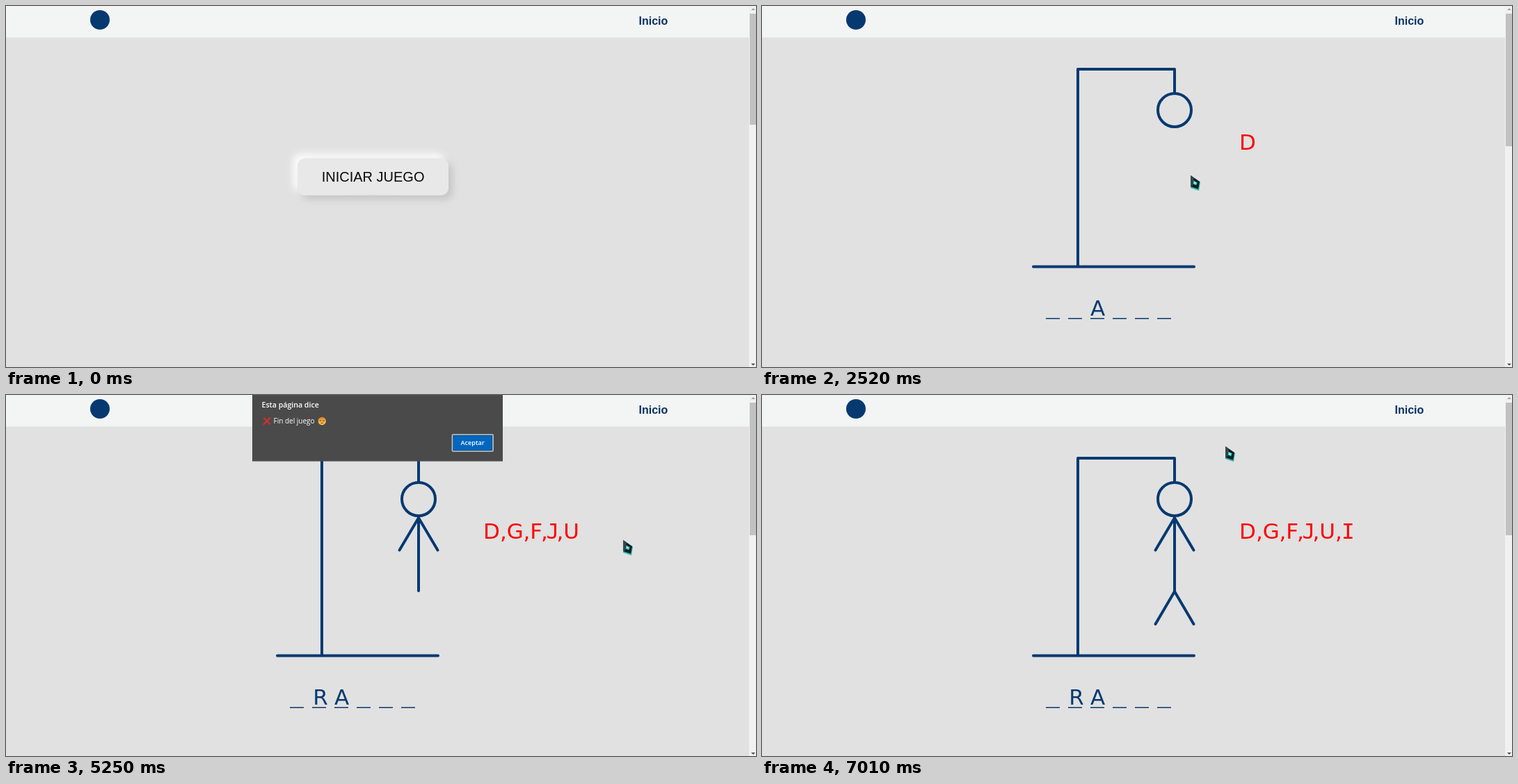
Recreate the animation shown at these times as an HTML page. Size 1078 by 520 pixels, loop 7.08 s.

```html
<!DOCTYPE html>
<html lang="es">
<head>
<meta charset="utf-8">
<title>Juego del ahorcado</title>
<style>
  html, body { margin: 0; width: 100%; height: 100%; overflow: hidden; background: #e1e1e1; }
  svg { display: block; width: 1078px; height: 520px; }
  .arial { font-family: "Liberation Sans", Arial, sans-serif; }
  .game { font: 31px "DejaVu Sans", Verdana, sans-serif; }
  .mono { font-family: "DejaVu Sans Mono", monospace; }
  .dialog { font-family: "Open Sans", "Noto Sans", sans-serif; fill: #fff; }
  .line { fill: none; stroke: #063970; stroke-width: 4; stroke-linecap: round; stroke-linejoin: round; }
</style>
</head>
<body>
<svg viewBox="0 0 1078 520">
  <defs>
    <filter id="soft" x="-20%" y="-60%" width="140%" height="220%"><feGaussianBlur stdDeviation="5.5"/></filter>
    <clipPath id="inside"><rect x="420" y="220" width="215" height="52" rx="9"/></clipPath>
    <linearGradient id="face" x2="0" y2="1"><stop stop-color="#d9822b"/><stop offset="1" stop-color="#ffd257"/></linearGradient>
  </defs>

  <rect width="1078" height="520" fill="#e1e1e1"/>
  <rect width="1068" height="45.5" fill="#f2f5f4"/>
  <circle cx="135" cy="20" r="14" fill="#063970"/>
  <text class="arial" x="909.5" y="27" font-size="16" font-weight="bold" fill="#0a3160">Inicio</text>

  <rect x="1068" width="10" height="520" fill="#f1f1f1"/>
  <rect id="thumb" x="1069" y="11" width="9" height="160" fill="#c1c1c1"/>
  <path d="M1071 6l3-3 3 3z" fill="#a3a3a3"/>
  <path d="M1071 515l3 3 3-3z" fill="#505050"/>

  <g id="start">
    <rect x="413" y="213.5" width="217" height="53" rx="10" fill="#fff" filter="url(#soft)"/>
    <rect x="425" y="225.5" width="217" height="53" rx="10" fill="#c5c5c5" filter="url(#soft)"/>
    <rect x="419" y="219.5" width="217" height="53" rx="10" fill="#e8e8e8"/>
    <g clip-path="url(#inside)"><ellipse id="wave1"/><ellipse id="wave2"/></g>
    <rect id="border" x="419.5" y="220" width="216" height="52" rx="10" fill="none"/>
    <text id="label" class="arial" x="453.7" y="253" font-size="20">INICIAR JUEGO</text>
  </g>

  <g id="board">
    <g class="line">
      <path d="M390 375.5H621M454 375V91H593V126"/>
      <g id="parts"></g>
    </g>
    <path d="M408 450.2H588" stroke="#063970" stroke-width="1.6" stroke-dasharray="20 12"/>
    <g id="word" class="game" fill="#063970" text-anchor="middle"></g>
    <g id="misses" class="game" fill="#f00"></g>
  </g>

  <g id="alert" class="dialog">
    <rect x="354" width="360" height="95.5" fill="#4a4a4a"/>
    <text x="367.5" y="18" font-size="10.6" font-weight="600">Esta página dice</text>
    <path d="M371 33.5l8 8M379.5 33l-9 9" stroke="#d6302b" stroke-width="2.2" stroke-linecap="round"/>
    <text x="384.5" y="41" font-size="10">Fin del juego</text>
    <circle cx="454.3" cy="37.5" r="5.7" fill="url(#face)"/>
    <path d="M450.7 37h2.4M455.5 37h2.4M452.5 41q1.8-1.8 3.6 0" fill="none" stroke="#653a18"/>
    <rect x="641.5" y="57" width="58.5" height="24" rx="1" fill="#333" stroke="#b9cfe2" stroke-width="1.6"/>
    <rect id="accept" x="643" y="58.5" width="55.5" height="21"/>
    <text x="670.7" y="72" font-size="9.1" font-weight="600" text-anchor="middle">Aceptar</text>
  </g>

  <g id="cursor">
    <path d="M0 0L14 9.5L12 22L0 18z" fill="#2bb5a6"/>
    <path d="M0 0L13 9L11 19.5L0 16z" fill="#0b1d24"/>
    <path d="M0 0L5 3.5L3 15L0 16z" fill="#35474c"/>
    <path d="M4.3 7.5L9.6 10.2L8.2 14.2L3.8 12.4z" fill="#39d0bd"/>
    <path d="M5.6 9.5l2 1-.6 1.8-1.7-.8z" fill="#d5fff7"/>
  </g>
</svg>
<script>
const LOOP = 7080, STEP = 70;
const HOVER = 840, PLAY = 1400, ALERT_ON = 4480, ACCEPT_HOVER = 6440, PRESS = 6720, ALERT_OFF = 6790;
const NAVY = [6, 57, 112];
const $ = id => document.getElementById(id);

const parts = [
  ["M569 150a24 24 0 1 1 48 0a24 24 0 1 1-48 0", 2030],
  ["M593 175V282", 3080],
  ["M593 177L565.5 223.5", 3500],
  ["M593 177L620.5 223.5", 3920],
  ["M593 283L565.5 330", ALERT_OFF],
  ["M593 283L620.5 330", ALERT_OFF]
];
const misses = [
  ["D", 686, 2030], [",G", 710, 3080], [",F", 743.5, 3500],
  [",", 769, 3920], ["J", 776.5, 3920, "mono"],
  [",U", 791.5, 4270],
  [",", 824, ALERT_OFF], ["I", 833, ALERT_OFF, "mono"]
];
const hits = [["A", 482.5, 2380], ["R", 452, 2730]];

// time, x, y of the pointer tip
const path = [
  [70, 953, 505], [770, 474, 278], [840, 482, 262], [1050, 492, 247], [1330, 500, 246],
  [1610, 545, 246], [2100, 616, 244], [3010, 616, 244], [3430, 607, 288], [4550, 607, 288],
  [4900, 760, 156], [5250, 887, 209], [5600, 925, 310], [5740, 920, 358],
  [5880, 902, 361], [5950, 894, 371], [6090, 885, 394], [6510, 666, 74]
];

const clamp = v => Math.max(0, Math.min(1, v));
const mix = (a, b, p) => a + (b - a) * p;
const mixColor = (a, b, p) => `rgb(${a.map((v, i) => Math.round(mix(v, b[i], p)))})`;

function add(parent, tag, attrs, text = "") {
  const el = document.createElementNS("http://www.w3.org/2000/svg", tag);
  for (const key in attrs) el.setAttribute(key, attrs[key]);
  el.textContent = text;
  $(parent).append(el);
  return el;
}
const set = (id, attrs) => { for (const key in attrs) $(id).setAttribute(key, attrs[key]); };
const show = (el, on) => el.setAttribute("visibility", on ? "visible" : "hidden");

const timed = [
  ...parts.map(([d, at]) => [add("parts", "path", { d }), at]),
  ...misses.map(([s, x, at, cls = ""]) => [add("misses", "text", { x, y: 206.5, class: cls }, s), at]),
  ...hits.map(([s, x, at]) => [add("word", "text", { x, y: 446 }, s), at])
];

// cubic-bezier(x1, 0, x2, 1)
function bezier(x, x1, x2) {
  let lo = 0, hi = 1;
  for (let i = 0; i < 24; i++) {
    const s = (lo + hi) / 2, r = 1 - s;
    if (3 * r * r * s * x1 + 3 * r * s * s * x2 + s ** 3 < x) lo = s; else hi = s;
  }
  return lo * lo * (3 - 2 * lo);
}

function wave(id, p, cx, w, h, scaleX, from, to) {
  const top = 220 + 51 * mix(from, to, p);
  set(id, {
    cx, cy: top + h / 2,
    rx: w / 2 * mix(scaleX, 0.8, p),
    ry: h / 2 * mix(1, 1.3, p)
  });
}

function drawButton(t) {
  const tint = clamp((t - HOVER) / 200) ** 1.6;
  const p = bezier(clamp((t - HOVER - 100) / 500), 0.55, 0.1);
  wave("wave1", p, 527.5, 301, 92, 1.25, 1, -0.35);
  wave("wave2", p, 538, 344, 97, 1.45, 1.8, -0.45);
  set("wave1", { fill: mixColor([0, 0, 0], NAVY, Math.min(1, p * 4)), "fill-opacity": mix(0.05, 1, p) });
  set("wave2", { fill: `rgb(${NAVY})` });
  set("border", { stroke: mixColor([232, 232, 232], NAVY, tint) });
  set("label", { fill: mixColor([9, 9, 9], [255, 255, 255], tint) });
}

function pointer(t) {
  const i = path.findIndex(k => k[0] > t);
  if (i < 0) return path[path.length - 1].slice(1);
  const [a, b] = [path[Math.max(0, i - 1)], path[i]];
  const p = clamp((t - a[0]) / (b[0] - a[0] || 1));
  return [mix(a[1], b[1], p), mix(a[2], b[2], p)];
}

function render(time) {
  const t = Math.floor(time % LOOP / STEP) * STEP;
  const playing = t >= PLAY;
  $("start").style.display = playing ? "none" : "";
  $("board").style.display = playing ? "" : "none";
  $("alert").style.display = t >= ALERT_ON && t < ALERT_OFF ? "" : "none";
  set("thumb", { height: playing ? 191 : 160 });
  set("accept", { fill: t >= PRESS ? "#0058a6" : t >= ACCEPT_HOVER ? "#1874c6" : "#0067c0" });
  if (!playing) drawButton(t);
  for (const [el, at] of timed) show(el, t >= at);
  show($("cursor"), t >= path[0][0]);
  set("cursor", { transform: `translate(${pointer(t)})` });
}

const begin = performance.now();
function tick() {
  render(performance.now() - begin);
  requestAnimationFrame(tick);
}
tick();
</script>
</body>
</html>
```
